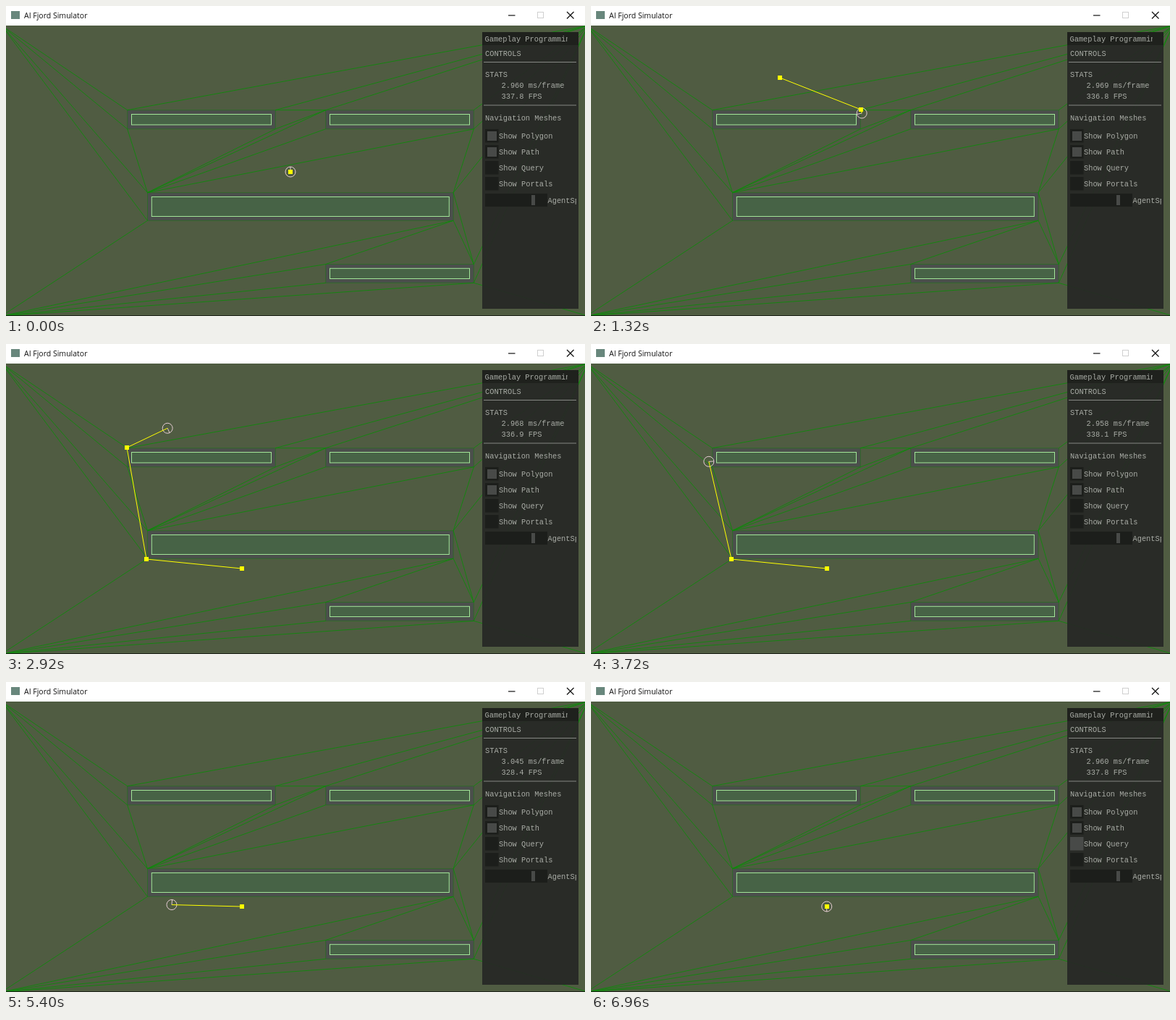
An HTML page with a canvas for the animation above (7 s loop, 800x428 px).

```html
<!DOCTYPE html>
<html lang="en">
<head>
<meta charset="utf-8">
<title>Navigation mesh</title>
<style>
html, body { margin: 0; width: 100%; height: 100%; overflow: hidden; background: #505c42; }
canvas { display: block; }
</style>
</head>
<body>
<canvas id="stage" width="800" height="428"></canvas>
<script>
const ctx = document.getElementById('stage').getContext('2d');
const LOOP = 7000, STEP = 10, TOP = 27, PAD = 5.8;
const YELLOW = '#ffff00', AGENT = '#e6cdd4', TEXT = '#a9aca6', SLOT = '#1c1e1b', KNOB = '#484a48';

// Obstacles: x, y, width, height
const walls = [[173.5, 149.5, 193, 14.5], [447.5, 149.5, 193, 14.5], [201.3, 263.5, 411, 27], [447.5, 362.3, 193, 14.2]];

// Vertex "2b" is corner b of wall 2; corners run a, b, c, d clockwise from the top left
function vertex(id) {
  const [x, y, w, h] = walls[id[0]], k = 'abcd'.indexOf(id[1]);
  return [k === 1 || k === 2 ? x + w + PAD : x - PAD, k > 1 ? y + h + PAD : y - PAD];
}

// Each fan joins its hub to all the listed vertices
const fans = [
  [[-6, TOP], '0a 0d 2a 2d'],
  [[804, TOP], '0a 0b 1a 1b 1c 2b 3b 3c'],
  [[-6, 428], '2d 2c 3a 3d 3c'],
  [[804, 428], '3c'],
  [vertex('2a'), '0d 0c 1a 1d 1c'],
  [vertex('1a'), '0b 0c'],
  [vertex('3b'), '2b 2c'],
  [vertex('2b'), '1c'],
  [vertex('2c'), '3a']
].map(([hub, ids]) => [hub, ids.split(' ').map(vertex)]);

const START = [393, 229];
const orders = [
  { at: 420, path: [[373, 143], [261, 99]] },
  { at: 2400, path: [[167, 143], [194, 297], [325.5, 310]] }
];

// Seek steering with lagging velocity; the agent slows down at its last waypoint
function simulate() {
  const SPEED = 108, LAG = .14, REACH = 5, dt = STEP / 1000;
  const states = [];
  let [x, y] = START, vx = 0, vy = 0, heading = [1, 0], path = [START];
  for (let t = 0; t < LOOP; t += STEP) {
    const order = orders.find(o => o.at === t);
    if (order) path = order.path;
    if (path.length > 1 && Math.hypot(path[0][0] - x, path[0][1] - y) < REACH) path = path.slice(1);
    states.push({ x, y, heading, path });
    const dx = path[0][0] - x, dy = path[0][1] - y, dist = Math.hypot(dx, dy) || 1;
    const wish = path.length > 1 ? SPEED : Math.min(SPEED, dist * 5);
    vx += (dx / dist * wish - vx) * dt / LAG;
    vy += (dy / dist * wish - vy) * dt / LAG;
    x += vx * dt;
    y += vy * dt;
    const v = Math.hypot(vx, vy);
    if (v > 8) heading = [vx / v, vy / v];
  }
  return states;
}
const states = simulate();

function fpsAt(t) {
  const dip = 22 * Math.exp(-(((t - 4880) / 587) ** 2));
  return 337.8 + Math.sin(t / 277) - dip;
}

function box(x, y, w, h, color) {
  ctx.fillStyle = color;
  ctx.fillRect(x, y, w, h);
}

function frame(x, y, w, h, color) {
  ctx.strokeStyle = color;
  ctx.lineWidth = 1;
  ctx.strokeRect(x, y, w, h);
}

function line(points, color, width = 1) {
  ctx.strokeStyle = color;
  ctx.lineWidth = width;
  ctx.beginPath();
  points.forEach(p => ctx.lineTo(...p));
  ctx.stroke();
}

function text(str, x, y) {
  ctx.fillStyle = TEXT;
  ctx.fillText(str, x, y);
}

function clipped(x, y, w, h, paint) {
  ctx.save();
  ctx.beginPath();
  ctx.rect(x, y, w, h);
  ctx.clip();
  paint();
  ctx.restore();
}

function drawWorld() {
  box(0, TOP, 800, 401, '#505c42');
  for (const [x, y, w, h] of walls) {
    const outer = [x - PAD, y - PAD, w + 2 * PAD, h + 2 * PAD];
    box(...outer, '#4b4f4c');
    frame(...outer, 'rgba(20,125,15,.5)');
    box(x, y, w, h, '#476346');
    frame(x, y, w, h, '#a2e698');
  }
  for (const [hub, ends] of fans)
    for (const end of ends) line([hub, end], 'rgba(8,142,6,.8)');
}

function drawAgent(t) {
  const { x, y, heading: [hx, hy], path } = states[Math.floor(t / STEP)];
  ctx.strokeStyle = AGENT;
  ctx.lineWidth = 1;
  ctx.beginPath();
  ctx.arc(x, y, 7, 0, 7);
  ctx.stroke();
  // The mark in the circle sits a quarter turn left of travel
  line([[x, y], [x + hy * 7, y - hx * 7]], AGENT);
  line([[x, y], ...path], YELLOW);
  path.forEach(p => box(Math.round(p[0]) - 3, Math.round(p[1]) - 3, 6, 6, YELLOW));
}

function drawPanel(t) {
  box(658, 36, 133, 382, 'rgba(38,40,37,.92)');
  box(658, 36, 133, 18, '#1f211d');
  ctx.font = '10.35px "Liberation Mono", monospace';
  clipped(658, 36, 118, 18, () => text('Gameplay Programming', 661.5, 49));
  text('CONTROLS', 662, 68.5);
  text('STATS', 662, 98);
  const fps = fpsAt(t);
  text((1000 / fps).toFixed(3) + ' ms/frame', 684.5, 113);
  text(fps.toFixed(1) + ' FPS', 684.5, 128);
  text('Navigation Meshes', 662, 157.5);
  box(660, 77, 128, 1, '#858783');
  box(660, 136.5, 128, 1, '#858783');
  const hovered = t >= 6760;
  ['Polygon', 'Path', 'Query', 'Portals'].forEach((name, i) => {
    const y = 170 + i * 22;
    box(662, y, 18.5, 18.5, hovered && i === 2 ? KNOB : SLOT);
    if (i < 2) box(665, y + 3, 13, 13, KNOB);
    text('Show ' + name, 681, y + 13);
  });
  box(662, 259, 86, 18, SLOT);
  box(726, 261, 5, 14, KNOB);
  clipped(748, 259, 40, 18, () => text('AgentSpeed', 748.5, 271.5));
}

function drawTitleBar() {
  box(0, 0, 800, TOP, '#ffffff');
  box(7, 7, 12, 11, '#68877c');
  ctx.font = '10.5px "Open Sans", sans-serif';
  ctx.fillStyle = '#111';
  ctx.fillText('AI Fjord Simulator', 25, 17);
  line([[694, 13], [703.5, 13]], '#111', 1.2);
  frame(734.5, 8.5, 8, 8, '#cfcfcf');
  line([[775, 8], [784.5, 17.5]], '#111', 1.2);
  line([[784.5, 8], [775, 17.5]], '#111', 1.2);
}

function draw(t) {
  drawWorld();
  drawAgent(t);
  drawPanel(t);
  drawTitleBar();
  box(0, 427, 800, 1, '#20251c');
}

const start = performance.now();
function tick() {
  draw((performance.now() - start) % LOOP);
  requestAnimationFrame(tick);
}
tick();
</script>
</body>
</html>
```
